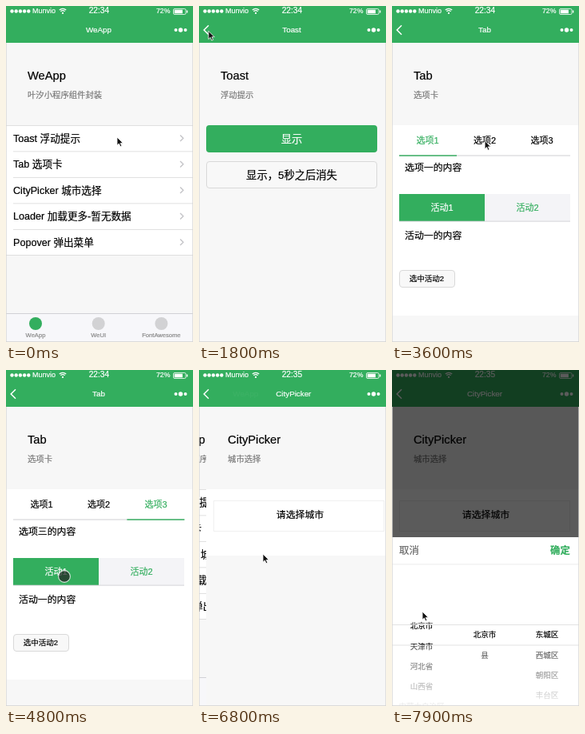
An HTML page for the animation above (8000 ms loop, 234 by 420 pixels).

```html
<!DOCTYPE html>
<html lang="zh-CN">
<head>
<meta charset="utf-8">
<title>WeApp</title>
<style>
html, body { margin: 0; width: 100%; height: 100%; overflow: hidden; background: #f7f7f7; }
svg { display: block; width: 100vw; height: 100vh; }
text {
  font-family: "Liberation Sans", "Noto Sans CJK SC", "Noto Sans CJK", sans-serif;
  white-space: pre; fill: currentColor; stroke: currentColor; stroke-width: .2;
}
</style>
</head>
<body>
<svg id="stage" viewBox="0 0 234 420"></svg>
<script>
const LOOP = 8000, W = 234, H = 420, SHEET = 211;
const GREEN = '#33ae5e', GREY = '#f7f7f7', LINE = '#d9d9d9';
const $ = id => document.getElementById(id);
const set = (id, attrs) => {
  for (const key in attrs) $(id).setAttribute(key, attrs[key]);
};

// y is the optical middle of the text line
const text = (s, x, y, size, color = '#000', extra = '') =>
  `<text x="${x}" y="${y + size * .36}" font-size="${size}" color="${color}" ${extra}>${s}</text>`;
const mid = (s, x, y, size, color, extra = '') => text(s, x, y, size, color, 'text-anchor="middle" ' + extra);
const rect = (x, y, w, h, fill, extra = '') =>
  `<rect x="${x}" y="${y}" width="${w}" height="${h}" fill="${fill}" ${extra}/>`;
const box = (x, y, w, h, extra = '') =>
  rect(x + .5, y + .5, w - 1, h - 1, '#f8f8f8', `rx="3.5" stroke="${LINE}" ${extra}`);
const dot = (x, y, r, fill) => `<circle cx="${x}" cy="${y}" r="${r}" fill="${fill}"/>`;
const path = (d, stroke, width, extra = '') =>
  `<path d="${d}" fill="none" stroke="${stroke}" stroke-width="${width}" ${extra}/>`;
const group = (id, body) => `<g id="${id}">${body}</g>`;
const repeat = (n, draw) => Array.from({ length: n }, (_, i) => draw(i)).join('');

const page = (id, title, note, body) => group(id,
  rect(0, 46, W, H - 46, GREY) + text(title, 27, 87, 14.7) +
  text(note, 27, 111, 10.35, '#777') + body);

const rows = ['Toast 浮动提示', 'Tab 选项卡', 'CityPicker 城市选择', 'Loader 加载更多-暂无数据', 'Popover 弹出菜单'];
const listRow = (label, i) => {
  const y = 149 + i * 32.5, m = y + 16.3;
  return rect(0, y, W, 32.5, '#fff', `id="row${i}"`) +
    rect(i ? 9 : 0, y, W, .8, LINE) + text(label, 9, m, 12.6) +
    path(`M218 ${m - 3.8}l3.8 3.8l-3.8 3.8`, '#c4c4c8', 1.4);
};
const navItem = (label, i) => {
  const x = 37 + i * 78.7;
  return dot(x, 397, 8, i ? '#d2d2d4' : GREEN) + mid(label, x, 411, 7.6, '#888');
};

const home = page('home', 'WeApp', '叶汐小程序组件封装',
  rows.map(listRow).join('') + rect(0, 311.2, W, .8, LINE) +
  rect(0, 384, W, 36, '#f7f7fa') + rect(0, 384, W, .8, '#c9c9cd') +
  ['WeApp', 'WeUI', 'FontAwesome'].map(navItem).join(''));

const toast = page('toast', 'Toast', '浮动提示',
  rect(9, 149, 214, 34, GREEN, 'rx="4"') + mid('显示', 116, 166, 13.3, '#fff') +
  box(9, 194, 214, 34) + mid('显示，5秒之后消失', 116, 211, 13.3) +
  group('tip', rect(78, 377, 77, 28, '#000', 'rx="4" fill-opacity=".7"') +
    mid('浮动提示', 116.5, 391, 11, '#fff')));

const tab = page('tab', 'Tab', '选项卡',
  rect(0, 149, W, 238, '#fff') + rect(9, 186.5, 214, 1, '#cfcfd4') +
  rect(0, 186.3, 72, 1.4, GREEN, 'id="bar"') +
  repeat(3, i => mid('选项' + (i + 1), 44.5 + i * 71.5, 168, 11, '#000', `id="opt${i}"`)) +
  text('', 16, 202, 11.9, '#000', 'id="optText"') +
  repeat(2, i => rect(9 + i * 107, 235, 107, 34, GREEN, `id="actBox${i}"`) +
    mid('活动' + (i + 1), 62.5 + i * 107, 252, 11, '#fff', `id="act${i}"`)) +
  rect(9, 268.7, 214, .8, '#c9c9ce') +
  text('', 16, 287, 11.9, '#000', 'id="actText"') +
  box(9, 330, 70, 22, 'id="pick"') + mid('选中活动2', 43.5, 341, 9.5));

const city = page('city', 'CityPicker', '城市选择',
  rect(0, 149, W, 83, '#fff') + rect(9.5, 163.5, 213, 38, '#fff', 'stroke="#f0f0f0"') +
  mid('请选择城市', 117.5, 181, 11.9));

const titles = { home: 'WeApp', toast: 'Toast', tab: 'Tab', city: 'CityPicker' };
const header = rect(0, 0, W, 46, GREEN) +
  repeat(5, i => dot(7.5 + i * 5.2, 6.5, 2.2, '#fff')) +
  text('Munvio', 33, 6, 9, '#fff') +
  path('M66.8 5a6 6 0 0 1 8.4 0M68.4 6.8a3.8 3.8 0 0 1 5.2 0', '#fff', 1.2) + dot(71, 8.9, 1.1, '#fff') +
  mid('', 116.4, 5.7, 10.2, '#fff', 'id="clock"') + text('72%', 188, 6, 8.7, '#fff') +
  rect(209.5, 3.5, 15.5, 7, 'none', 'rx="1.5" stroke="#fff" stroke-width=".8"') +
  rect(210.7, 4.7, 10.2, 4.6, '#fff') + rect(226, 5.5, 1.3, 3, '#fff') +
  Object.entries(titles).map(([id, s]) => mid(s, 116, 29.1, 9.8, '#fff', `id="${id}Title"`)).join('') +
  path('M12 24.2L6.2 30L12 35.8', '#fff', 1.5, 'id="back"') +
  repeat(3, i => dot(212.5 + i * 6, 30, i === 1 ? 2.7 : 2, '#fff'));

const column = (id, x, items) => group(id,
  items.map((s, i) => mid(s, x, 122 + i * 25.2, 9.5)).join(''));
const sheet = group('sheet',
  rect(0, 0, W, SHEET, '#fff') + text('取消', 9, 17, 12.4, '#666') +
  text('确定', 198, 17, 12.4, GREEN, 'font-weight="700"') + rect(0, 33.5, W, .8, '#e8e8e8') +
  column('province', 37, ['北京市', '天津市', '河北省', '山西省', '内蒙古自治区']) +
  column('town', 116, ['北京市', '县']) +
  column('district', 194, ['东城区', '西城区', '朝阳区', '丰台区']) +
  rect(0, 35, W, 74.5, 'url(#fadeUp)') + rect(0, 135, W, 76, 'url(#fadeDown)') +
  rect(0, 109.2, W, .8, '#dcdcdc') + rect(0, 134.6, W, .8, '#dcdcdc'));

const fade = (id, from, to) => `<linearGradient id="${id}" x2="0" y2="1">
  <stop stop-color="#fff" stop-opacity="${from}"/><stop offset="1" stop-color="#fff" stop-opacity="${to}"/></linearGradient>`;

$('stage').innerHTML = '<defs>' + fade('fadeUp', .95, .3) + fade('fadeDown', .3, .95) + '</defs>' +
  home + toast + tab + city + header +
  rect(0, 0, W, 46, '#000', 'id="headMask"') + rect(0, 46, W, H - 46, '#000', 'id="mask"') + sheet +
  rect(0, 46, .7, H, '#d4d4d4') + rect(W - .7, 46, .7, H, '#d4d4d4') + rect(0, H - .8, W, .8, '#d4d4d4') +
  group('arrow', '<path d="M0 0V10.2L2.4 8L4 11.8L5.8 11L4.2 7.4H7.4Z" fill="#111" stroke="#fff" stroke-width=".8"/>') +
  group('touch', '<circle r="7.4" fill="#222" fill-opacity=".72" stroke="#fff" stroke-opacity=".8" stroke-width="1.1"/>');

// Everything follows from these taps: time, x, y
const taps = {
  openToast: [100, 139, 164],
  show: [850, 122, 167],
  leaveToast: [1880, 10, 29],
  openTab: [2950, 120, 185],
  option2: [3690, 116, 168],
  option3: [4000, 187, 168],
  activity2: [4380, 170, 254],
  activity1: [4750, 73, 258],
  pick: [5140, 44, 341],
  leaveTab: [5400, 9.2, 30],
  openCity: [6390, 80, 230],
  choose: [7300, 109.5, 185],
  drag: [7720, 38, 322]
};
const HOLD = 150, TRAVEL = 380, REST = 50;
const visits = [['toast', 'openToast', 'leaveToast'], ['tab', 'openTab', 'leaveTab'], ['city', 'openCity']];

const ease = v => v * v * (3 - 2 * v);
const since = (tap, t, delay, length) =>
  tap ? ease(Math.min(1, Math.max(0, (t - taps[tap][0] - delay) / length))) : 0;
const done = (tap, t) => t >= taps[tap][0] + REST;
const held = (tap, t, length = HOLD) => t >= taps[tap][0] && t < taps[tap][0] + length;

function pointer(t) {
  const list = Object.values(taps);
  const next = list.findIndex(tap => tap[0] > t);
  if (next === 0) return list[0].slice(1);
  if (next < 0) return list[list.length - 1].slice(1);
  const [last, x, y] = list[next - 1], [time, toX, toY] = list[next];
  const end = time - REST, begin = Math.max(last + HOLD, end - TRAVEL);
  const p = ease(Math.min(1, Math.max(0, (t - begin) / (end - begin))));
  return [x + (toX - x) * p, y + (toY - y) * p];
}

function drawPages(t) {
  let depth = 0;
  for (const [id, open, leave] of visits) {
    const p = since(open, t, 120, 330) - since(leave, t, 120, 330);
    set(id, { transform: `translate(${W * (1 - p)} 0)`, visibility: p > 0 ? 'visible' : 'hidden' });
    set(id + 'Title', { opacity: p, transform: `translate(${60 * (1 - p)} 0)` });
    depth = Math.max(depth, p);
  }
  set('home', { transform: `translate(${-70 * depth} 0)` });
  set('homeTitle', { opacity: 1 - depth, transform: `translate(${-60 * depth} 0)` });
  set('back', { opacity: depth });
  visits.forEach(([, open], i) => set('row' + i, { fill: held(open, t, 400) ? '#ececec' : '#fff' }));
}

function drawTabs(t) {
  const opt = done('option2', t) + done('option3', t);
  const act = done('activity2', t) - done('activity1', t) + done('pick', t);
  for (let i = 0; i < 3; i++) set('opt' + i, { color: i === opt ? GREEN : '#000' });
  set('bar', { x: 9 + opt * 71.2 });
  $('optText').textContent = `选项${'一二三'[opt]}的内容`;
  for (let i = 0; i < 2; i++) {
    set('actBox' + i, { fill: i === act ? GREEN : '#f4f4f7' });
    set('act' + i, { color: i === act ? '#fff' : GREEN });
  }
  $('actText').textContent = `活动${'一二'[act]}的内容`;
  set('pick', { fill: held('pick', t) ? '#dedede' : '#f8f8f8' });
}

function draw(t) {
  drawPages(t);
  drawTabs(t);
  $('clock').textContent = t < 5300 ? '22:34' : '22:35';
  set('tip', { opacity: since('show', t, 100, 150) - since('show', t, 700, 150) });

  const rise = since('choose', t, 0, 328), drag = since('drag', t, 0, HOLD);
  set('sheet', { transform: `translate(0 ${H - SHEET * rise})` });
  set('mask', { opacity: .645 * rise });
  set('headMask', { opacity: .645 * since('choose', t, 100, 228) });
  set('province', { transform: `translate(0 ${-11 * drag})` });

  const [x, y] = pointer(t);
  const down = Object.keys(taps).some(tap => held(tap, t));
  const transform = `translate(${x} ${y - 20 * drag})`;
  set('arrow', { transform, visibility: down ? 'hidden' : 'visible' });
  set('touch', { transform, visibility: down ? 'visible' : 'hidden' });
}

const start = performance.now();
function tick() {
  draw((performance.now() - start) % LOOP);
  requestAnimationFrame(tick);
}
tick();
</script>
</body>
</html>
```
